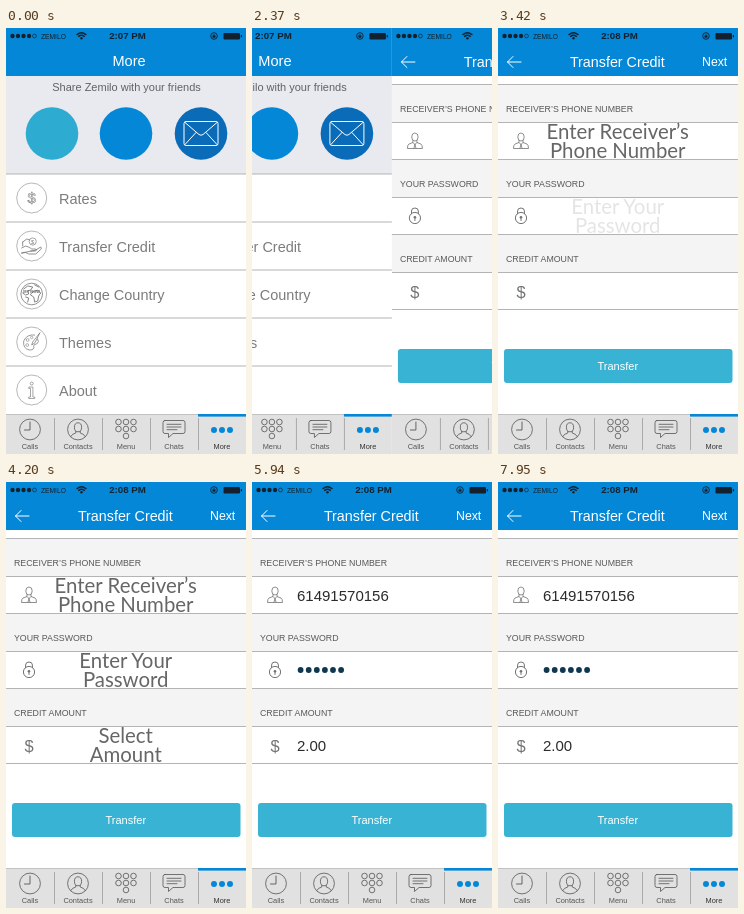
These frames come from a looping animation (240 by 426 pixels, 8 s). An HTML page:

```html
<!DOCTYPE html>
<html lang="en">
<head>
<meta charset="utf-8">
<title>Transfer credit</title>
<style>
html, body { margin: 0; width: 100%; height: 100%; overflow: hidden; background: #fff; }
svg { display: block; width: 100vw; height: 100vh; font-family: "Liberation Sans", Arial, sans-serif; }
</style>
</head>
<body>
<svg id="stage" viewBox="0 0 240 426"></svg>
<script>
const LOOP = 8000, STEP = 30;
const BLUE = '#0587d7', TEAL = '#38b3d4', INK = '#12212d', GREY = '#737373';

const rect = (x, y, w, h, fill, extra = '') =>
  `<rect x="${x}" y="${y}" width="${w}" height="${h}" fill="${fill}" ${extra}/>`;
const disc = (x, y, r, fill, extra = '') =>
  `<circle cx="${x}" cy="${y}" r="${r}" fill="${fill}" ${extra}/>`;
const ring = (x, y, r, color, width = 0.8) =>
  disc(x, y, r, 'none', `stroke="${color}" stroke-width="${width}"`);
const path = (d, color, width = 0.9) =>
  `<path d="${d}" fill="none" stroke="${color}" stroke-width="${width}" stroke-linecap="round" stroke-linejoin="round"/>`;
const text = (x, y, size, fill, str, extra = '') =>
  `<text x="${x}" y="${y}" font-size="${size}" fill="${fill}" ${extra}>${str}</text>`;
const centered = (x, y, size, fill, str, extra = '') =>
  text(x, y, size, fill, str, `text-anchor="middle" ${extra}`);
const rule = y => rect(0, y, 240, 1, '#b4b4b4');
const at = (x, y, body) => `<g transform="translate(${x} ${y})">${body}</g>`;

function statusBar(time) {
  const dots = [0, 1, 2, 3].map(i => disc(6.5 + i * 5.5, 8, 2.2, INK)).join('');
  return rect(0, 0, 240, 48, BLUE) + dots + ring(28.5, 8, 1.9, INK, 0.7) +
    text(35, 10.6, 6.7, INK, 'ZEMILO') +
    path('M71 6.6Q75.5 3 80 6.6M72.7 8.4Q75.5 6.2 78.3 8.4', INK, 1.4) + disc(75.5, 10.3, 1.2, INK) +
    centered(121.5, 11.4, 9.7, INK, time, 'font-weight="bold"') +
    ring(208, 8, 3.3, INK, 0.9) + rect(206.5, 7.5, 3, 2.2, INK) + ring(208, 7.3, 0.9, INK, 0.5) +
    rect(217.5, 5, 16.5, 6.4, INK, 'rx="1.2"') + rect(234.8, 7, 1.2, 2.4, INK);
}

function tabBar() {
  const c = '#555';
  const keys = [...Array(7).keys()].map(i =>
    ring(i < 6 ? 112.5 + (i % 3) * 7.5 : 120, 394 + Math.floor(i / 3) * 7, 2.8, c)).join('');
  const labels = ['Calls', 'Contacts', 'Menu', 'Chats', 'More'].map((s, i) =>
    centered(24 + i * 48, 421, 7.4, i === 4 ? '#333' : c, s)).join('');
  const dividers = [1, 2, 3, 4].map(i => rect(i * 48, 390, 1, 32, '#a9a9a9')).join('');
  return rect(0, 386, 240, 40, '#e1e1e1') + rect(0, 386, 240, 0.8, '#bbb') +
    dividers + rect(192, 386, 48, 2.6, BLUE) +
    ring(24, 401.5, 10.4, c) + path('M24 394V402H18.5', c) +
    ring(72, 401.5, 10.4, c) + `<ellipse cx="72" cy="399.3" rx="3.6" ry="4.5" fill="none" stroke="${c}" stroke-width=".8"/>` +
    path('M64.8 408.5Q66 405.8 69.8 405V403.3M79.2 408.5Q78 405.8 74.2 405V403.3', c, 0.8) +
    keys +
    path('M159 392.5H177Q179 392.5 179 394.5V403.5Q179 405.5 177 405.5H167L162.5 409.5V405.5H159Q157 405.5 157 403.5V394.5Q157 392.5 159 392.5ZM161 396.3H175M161 399H175M161 401.7H171', c, 0.8) +
    [208, 216, 224].map(x => disc(x, 402, 3, BLUE)).join('') + labels;
}

const rowIcons = [
  () => centered(0, 5.4, 15, 'none', '$', 'stroke="#808080" stroke-width=".6"'),
  () => ring(1, -4.5, 3.6, '#808080', 0.7) + centered(1, -2.4, 6, '#808080', '$') +
    path('M-10 2L-6 0Q-2 1 0 3H4Q5.5 4 4 5H-1M4 4L9 1Q10.5 2 9 3.5L4 8H-3L-6 6.5L-10 7ZM-9-4L-5-7L-2-6M-9-4V0', '#777', 0.8),
  () => ring(0, 0, 10.8, '#777', 0.8) +
    path('M-8-5L-4-8L1-7L-1-4L-4-3L-3 0L-6 1L-9-1M1-2L6-4L9-1L7 2L6 7L3 8L2 3L-1 1ZM-6 3L-3 4L-4 8M3-9L7-7', '#777', 0.9) +
    centered(0, -1.2, 4, '#666', 'MY NOW', 'font-weight="bold"'),
  () => path('M3-7Q-5-8-8-1Q-9 7-2 8Q3 8 2 4Q2 2 5 2Q8 0 6-3M8-9L1 0L0 3L3 1Z', '#808080', 0.8) +
    ring(-4, -2, 1.4, '#808080', 0.6) + ring(-4.5, 3, 1.4, '#808080', 0.6) + ring(0, -4.5, 1.2, '#808080', 0.6),
  () => ring(0, -6.5, 1.5, '#808080', 0.7) + path('M-2.5-3H1.2V7H3V8.5H-3V7H-1.2V-1.5H-2.5Z', '#808080', 0.7)
];

function moreScreen() {
  const rows = ['Rates', 'Transfer Credit', 'Change Country', 'Themes', 'About'].map((label, i) => {
    const y = 170 + i * 48;
    return ring(25.7, y, 15, '#999', 0.7) + at(25.7, y, rowIcons[i]()) +
      text(53, y + 6, 14.5, '#7c7c7c', label) + (i ? rule(y - 24.5) : '');
  }).join('');
  return rect(0, 0, 240, 426, '#fff') + statusBar('2:07 PM') +
    centered(123, 38, 14.6, '#fff', 'More') +
    rect(0, 48, 240, 98, '#e9e9f0') +
    centered(120.5, 63, 11, '#606066', 'Share Zemilo with your friends') +
    disc(46, 105.5, 26.3, '#2eabd0') + disc(120, 105.5, 26.3, BLUE) + disc(195, 105.5, 26.3, '#0a6cb9') +
    path('M180 93.5H210Q212 93.5 212 95.5V115.5Q212 117.5 210 117.5H180Q178 117.5 178 115.5V95.5Q178 93.5 180 93.5ZM179 94.5L193 106.5Q195 108 197 106.5L211 94.5M179 116.5L190 104.5M211 116.5L200 104.5', '#fff', 1) +
    rule(145.5) + rows + tabBar();
}

function prompt(id, y, first, second) {
  return `<g id="${id}">` + centered(119.7, y, 20.4, '#666', first, 'font-family="Lato, sans-serif"') +
    centered(119.7, y + 19, 20.4, '#666', second, 'font-family="Lato, sans-serif"') + '</g>';
}

function transferScreen() {
  const bands = ['RECEIVER’S PHONE NUMBER', 'YOUR PASSWORD', 'CREDIT AMOUNT'].map((label, i) => {
    const y = 56 + i * 75;
    return rect(0, y, 240, 38, '#f4f4f4') + rule(y) + rule(y + 38) + rule(y + 75) +
      text(8, y + 27.8, 8.8, '#595959', label);
  }).join('');
  const person = `<ellipse cx="0" cy="-4" rx="3.2" ry="4" fill="none" stroke="${GREY}" stroke-width=".8"/>` +
    path('M-2-.5V1.5L-6 3Q-7.5 4-7.5 7.5H7.5Q7.5 4 6 3L2 1.5V-.5M-2 1.5L0 3.5L2 1.5M0 3.5L-1 7M0 3.5L1 7', GREY, 0.8);
  const lock = ring(0, 2, 5.6, GREY, 1) + path('M-3.4-2.4V-5Q-3.4-8 0-8Q3.4-8 3.4-5V-2.4M0 2V4.5', GREY, 1) +
    disc(0, 1.3, 1.3, GREY);
  const dots = [...Array(6).keys()].map(i => disc(48.6 + i * 8.1, 188, 2.9, '#0f3850')).join('');
  return rect(0, 0, 240, 426, '#fff') + statusBar('2:08 PM') +
    centered(119.3, 38.8, 14.3, '#fff', 'Transfer Credit') +
    text(204, 38.3, 12.3, '#fff', 'Next') +
    path('M23 34H9.5M15 28.5L9.5 34L15 39.5', '#fff', 1) +
    bands + at(23, 113, person) + at(23, 188, lock) + centered(23, 269.5, 16.5, GREY, '$') +
    '<g id="values">' + text(45, 118.8, 15, '#2b2b2b', '61491570156') + dots +
    text(45, 268.8, 15, '#2b2b2b', '2.00') + '</g>' +
    prompt('receiver', 111, 'Enter Receiver’s', 'Phone Number') +
    prompt('password', 186, 'Enter Your', 'Password') +
    prompt('amount', 261, 'Select', 'Amount') +
    rect(6, 321, 228.5, 34, TEAL, 'rx="3"') + centered(119.8, 342.2, 11, '#fff', 'Transfer') +
    tabBar();
}

const stage = document.getElementById('stage');
stage.innerHTML = `<g id="more">${moreScreen()}</g><g id="transfer">${transferScreen()}</g>` +
  disc(123, 217.5, 24.8, '#b5b5b5', 'id="rowTap"') + disc(120, 337.5, 24.8, '#b5b5b5', 'id="buttonTap"');

const el = id => document.getElementById(id);
const progress = (t, from, to) => Math.min(1, Math.max(0, (t - from) / (to - from)));
const ease = p => p * p * (3 - 2 * p);
const fade = (id, value) => el(id).setAttribute('opacity', value);
const slide = (id, x) => el(id).setAttribute('transform', `translate(${x} 0)`);
const tap = (t, start) => 0.6 * progress(t, start, start + 240) * (1 - progress(t, start + 420, start + 660));

function draw(time) {
  const t = Math.floor(time / STEP + 1e-6) * STEP;
  const push = ease(progress(t, 2250, 2520)) * 240;
  slide('more', -push);
  slide('transfer', 240 - push);

  const filled = progress(t, 5640, 5940);
  ['receiver', 'password', 'amount'].forEach((id, i) => {
    const start = [2820, 3390, 4020][i];
    fade(id, progress(t, start, start + 180) * (1 - filled));
  });
  fade('values', filled);
  fade('rowTap', tap(t, 1410));
  fade('buttonTap', tap(t, 7290));
}

const begin = performance.now();
function tick() {
  draw((performance.now() - begin) % LOOP);
  requestAnimationFrame(tick);
}
draw(0);
requestAnimationFrame(tick);
</script>
</body>
</html>
```
